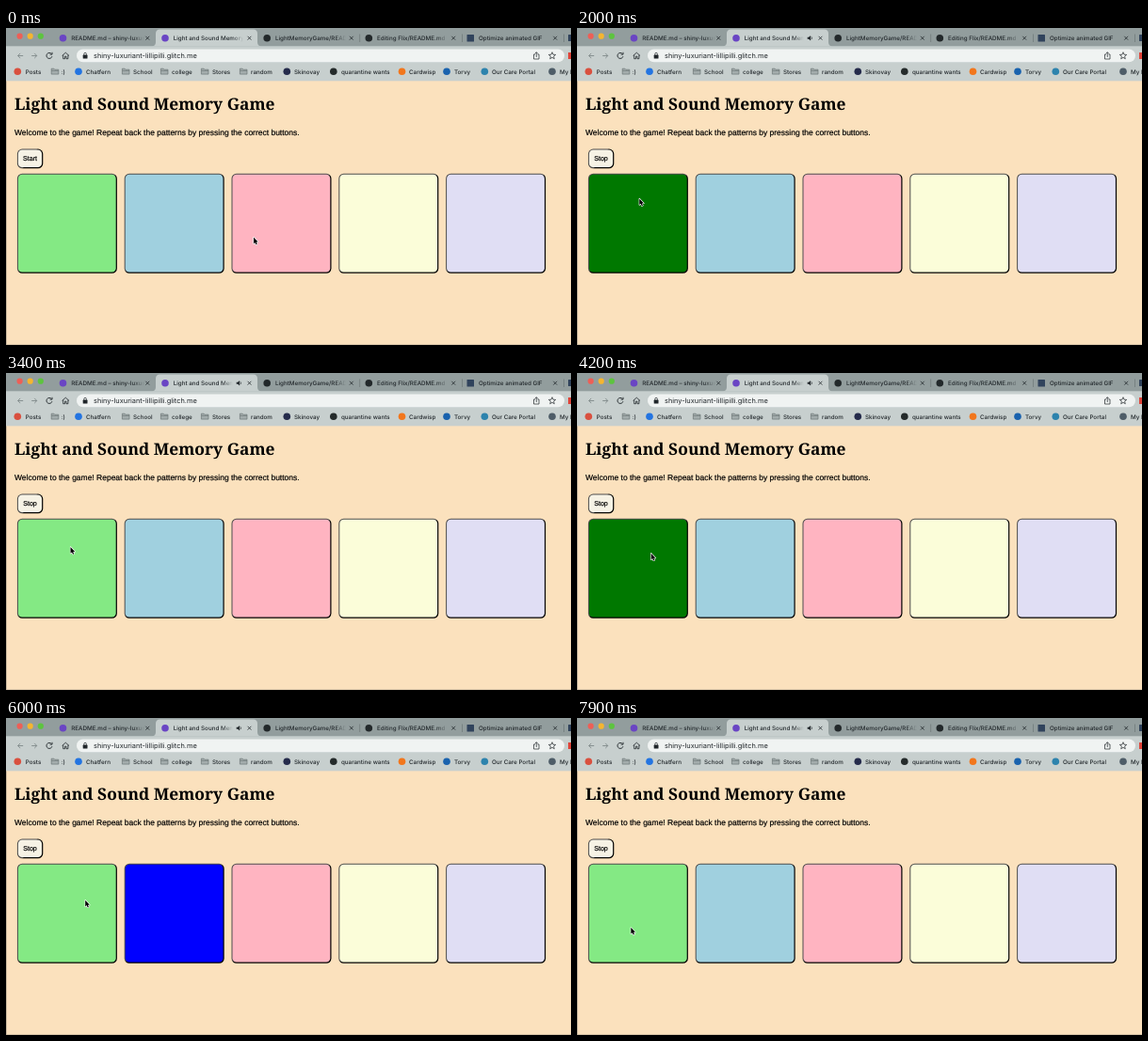
Recreate the animation shown at these times as an HTML page with a canvas. Size 600 by 337 pixels, loop 8 s.

```html
<!DOCTYPE html>
<html lang="en">
<head>
<meta charset="utf-8">
<title>Light and Sound Memory Game</title>
<style>
  html, body { margin: 0; width: 100%; height: 100%; overflow: hidden; background: #fbe1bd; }
  canvas { display: block; width: 600px; height: 337px; }
</style>
</head>
<body>
<canvas id="stage"></canvas>
<script>
const W = 600, H = 337, LOOP = 8000, STEP = 100;
const UI = 'Inter, Roboto, sans-serif';
const BODY = '"Liberation Sans", Arial, sans-serif';
const HEAD = '"Noto Serif", Georgia, serif';
const STRIP = '#929d9d', BAR = '#c7cfce', PILL = '#f0f3f2', INK = '#20262a';

const canvas = document.getElementById('stage');
const ctx = canvas.getContext('2d');
const dpr = window.devicePixelRatio || 1;
canvas.width = W * dpr;
canvas.height = H * dpr;
ctx.scale(dpr, dpr);
ctx.textRendering = 'geometricPrecision';

const pads = [
  { base: '#84e984', lit: '#007800' },
  { base: '#a0d0df', lit: '#0000ff' },
  { base: '#ffb4c1' },
  { base: '#fbfdd9' },
  { base: '#e0def4' }
];

// pad index, start, end: played clues and the player's presses
const flashes = [
  [0, 1700, 2700], [0, 3100, 3300],
  [0, 4000, 5000], [1, 5400, 6400],
  [0, 6500, 6700], [1, 7100, 7300]
];
const START_CLICK = 700, SOUND_ON = 1700;

// time, x, y of the pointer tip
const path = [
  [0, 263, 222.5], [200, 263, 222.5], [600, 27, 138], [800, 27, 138],
  [1200, 62.5, 173.8], [1700, 66, 181], [2900, 67.7, 183.7], [3400, 68.5, 185],
  [4200, 78.7, 191.7], [4800, 84.2, 193.7], [6600, 84.2, 193.7],
  [7000, 151.2, 193.8], [7300, 152, 195], [7900, 57.3, 222.8], [8000, 57.3, 222.8]
];

function text(str, x, y, size, color = INK, family = UI, weight = 500) {
  ctx.font = `${weight} ${size}px ${family}`;
  ctx.fillStyle = color;
  ctx.fillText(str, x, y);
}

// page copy is drawn a little heavier than its regular weight
function bodyText(str, x, y, size) {
  text(str, x, y, size, '#000', BODY, 400);
  ctx.strokeStyle = '#000';
  ctx.lineWidth = 0.2;
  ctx.strokeText(str, x, y);
}

function rect(x, y, w, h, color) {
  ctx.fillStyle = color;
  ctx.fillRect(x, y, w, h);
}

function round(x, y, w, h, r, color) {
  ctx.beginPath();
  ctx.roundRect(x, y, w, h, r);
  ctx.fillStyle = color;
  ctx.fill();
}

function dot(x, y, r, color) {
  ctx.beginPath();
  ctx.arc(x, y, r, 0, Math.PI * 2);
  ctx.fillStyle = color;
  ctx.fill();
}

function line(d, color = INK, width = 0.9) {
  ctx.strokeStyle = color;
  ctx.lineWidth = width;
  ctx.stroke(new Path2D(d));
}

function fadeText(str, x, end, y) {
  const g = ctx.createLinearGradient(end - 12, 0, end, 0);
  g.addColorStop(0, 'rgba(32,38,42,1)');
  g.addColorStop(1, 'rgba(32,38,42,0)');
  ctx.save();
  ctx.beginPath();
  ctx.rect(x, 0, end - x, 20);
  ctx.clip();
  text(str, x, y, 6.25, g);
  ctx.restore();
}

function tab(icon, x, title, end, close) {
  dot(x, 10.8, 3.8, icon);
  fadeText(title, x + 8.7, end, 13);
  line(`M${close - 1.9} 8.8l3.8 3.8m0-3.8l-3.8 3.8`, INK, 0.8);
}

function speaker(x, y) {
  ctx.fillStyle = INK;
  ctx.fill(new Path2D(`M${x - 2.6} ${y - 1}h1.5l1.9-1.7v5.4l-1.9-1.7h-1.5z`));
  line(`M${x + 1.6} ${y - 1.4}q1.3 1.4 0 2.8`, INK, 0.7);
}

function drawTabs(sound) {
  rect(0, 0, W, 20, STRIP);
  ['#ee5f56', '#f5b52f', '#5dc43f'].forEach((c, i) => dot(14.6 + i * 11.1, 8.7, 3.1, c));
  ctx.fillStyle = BAR;
  ctx.fill(new Path2D('M155 19.5q4-.5 4-4.5V6q0-4.5 4.5-4.5h99q4.5 0 4.5 4.5v9q0 4 4 4.5z'));
  tab('#6a45c4', 60.5, 'README.md – shiny-luxuriant', 147, 150.3);
  tab('#6a45c4', 169, 'Light and Sound Memory Game', sound ? 241 : 252, 258.5);
  if (sound) speaker(247.3, 10.7);
  tab('#22282a', 277.2, 'LightMemoryGame/README.md', 361, 366.8);
  tab('#22282a', 385.3, 'Editing Flix/README.md', 469, 475.2);
  round(489.5, 7, 7.5, 7.5, 0.5, '#30435c');
  fadeText('Optimize animated GIF', 502, 584, 13);
  line('M581.3 8.8l3.8 3.8m0-3.8l-3.8 3.8', INK, 0.8);
  [375.5, 484, 592].forEach(x => rect(x, 6.5, 0.6, 8.5, '#667171'));
  round(597, 7, 7, 7, 0.5, '#30435c');
}

function drawToolbar() {
  rect(0, 19.3, W, 37.2, BAR);
  line('M18.2 29.5h-5.6m2.6-2.6l-2.6 2.6 2.6 2.6', '#7f8989');
  line('M27.2 29.5h5.6m-2.6-2.6l2.6 2.6-2.6 2.6', '#7f8989');
  line('M48.3 27.5a3 3 0 1 0 .6 2.7M49 25.8v2.3h-2.4');
  line('M59.6 29.5l3.7-3.3 3.7 3.3m-6.3-.8v4h1.9v-2.5h1.4v2.5h1.9v-4', INK, 0.8);
  round(75, 22.6, 518, 13.6, 6.8, PILL);
  round(81.7, 28.6, 4.8, 3.9, 0.6, INK);
  line('M82.8 28.8v-1.2a1.3 1.3 0 0 1 2.6 0v1.2', INK, 0.7);
  text('shiny-luxuriant-lillipilli.glitch.me', 93, 32, 7.4, INK, UI, 400);
  line('M562 28h-1.5v5h5.5v-5h-1.5M563.25 31v-5.2m-1.6 1.5l1.6-1.6 1.6 1.6', INK, 0.7);

  ctx.beginPath();
  for (let i = 0; i < 10; i++) {
    const r = i % 2 ? 1.7 : 3.9, a = i * Math.PI / 5 - Math.PI / 2;
    ctx.lineTo(580 + r * Math.cos(a), 29.6 + r * Math.sin(a));
  }
  ctx.closePath();
  ctx.strokeStyle = INK;
  ctx.lineWidth = 0.7;
  ctx.stroke();
  rect(597, 26, 3, 7, '#e0453a');
}

function folder(x) {
  const d = `M${x - 3.6} 43.2h2.7l1 1h3.9v4.9h-7.6z`;
  ctx.fillStyle = '#a3acac';
  ctx.fill(new Path2D(d));
  line(d + `m0 2.2h7.6`, '#6c7676', 0.7);
}

function drawBookmarks() {
  const marks = [
    [12.3, 20.7, 'Posts', '#d9503f'], [51.8, 58.5, ':)'],
    [77, 85, 'Chatfern', '#2374e1'], [127, 135, 'School'],
    [168, 176, 'college'], [211, 219, 'Stores'], [252, 260, 'random'],
    [298.3, 306, 'Skinovay', '#252b4b'], [347.8, 356, 'quarantine wants', '#252b2b'],
    [420.5, 428, 'Cardwisp', '#f2761c'], [468, 476, 'Torvy', '#1962ae'],
    [508.3, 516, 'Our Care Portal', '#2d83ad'], [580, 588, 'My Notes', '#4e5d68']
  ];
  for (const [icon, x, label, color] of marks) {
    if (color) dot(icon, 46.3, 3.8, color);
    else folder(icon);
    text(label, x, 48.5, 6.25);
  }
}

// raised border: lighter above and left, black below and right
function raised(x, y, w, h, r, fill) {
  const g = ctx.createLinearGradient(x, y, x + w, y + h);
  g.addColorStop(0.49, '#4c4c4c');
  g.addColorStop(0.51, '#000');
  round(x, y, w, h, r, g);
  round(x + 1, y + 1, w - 2.2, h - 2.2, r - 1, fill);
}

function drawPage(t) {
  rect(0, 56.5, W, H - 56.5, '#fbe1bd');
  rect(0, 56.5, 0.6, H - 56.5, '#a99c89');
  rect(0, H - 0.6, W, 0.6, '#bdae96');
  text('Light and Sound Memory Game', 9, 86.5, 17.37, '#000', HEAD, 700);
  bodyText('Welcome to the game! Repeat back the patterns by pressing the correct buttons.',
    9, 114.3, 8.49);

  raised(11.9, 128.6, 27.4, 20.6, 5.3, '#f6f2e5');
  ctx.textAlign = 'center';
  bodyText(t < START_CLICK ? 'Start' : 'Stop', 25.5, 141.3, 7.1);
  ctx.textAlign = 'left';

  pads.forEach((pad, i) => {
    const on = flashes.some(([p, from, to]) => p === i && t >= from && t < to);
    raised(11.9 + i * 113.8, 154.8, 106, 106, 5.3, on ? pad.lit : pad.base);
  });
}

function pointerAt(t) {
  const i = path.findIndex(p => p[0] > t);
  const [t0, x0, y0] = path[i - 1], [t1, x1, y1] = path[i];
  const u = (t - t0) / (t1 - t0), k = u * u * (3 - 2 * u);
  return [x0 + (x1 - x0) * k, y0 + (y1 - y0) * k];
}

const arrow = new Path2D('M0 0V6.7L1.5 5.4 2.5 7.8 3.7 7.3 2.7 5H4.7Z');

function drawPointer(t) {
  const [x, y] = pointerAt(t);
  ctx.save();
  ctx.translate(x, y);
  ctx.lineJoin = 'round';
  ctx.lineWidth = 1.2;
  ctx.strokeStyle = '#fff';
  ctx.stroke(arrow);
  ctx.fillStyle = '#000';
  ctx.fill(arrow);
  ctx.restore();
}

const origin = performance.now();

function frame() {
  const now = (performance.now() - origin) % LOOP;
  const t = Math.floor(now / STEP) * STEP;
  drawTabs(t >= SOUND_ON);
  drawToolbar();
  drawBookmarks();
  drawPage(t);
  drawPointer(t);
  requestAnimationFrame(frame);
}
frame();
</script>
</body>
</html>
```
